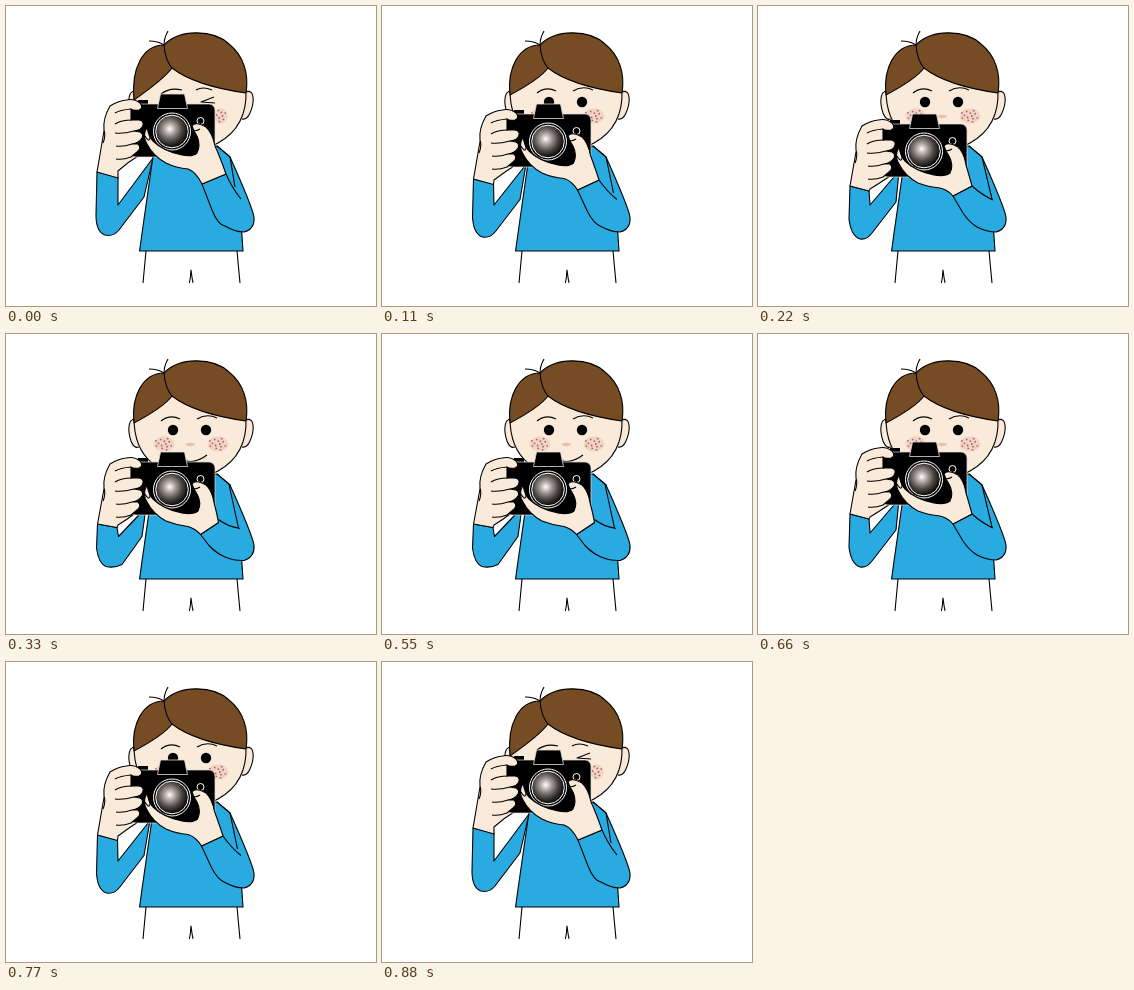
Animation, 370 px wide and 300 px high, one loop 0.99 s. Source, as an HTML page:

```html
<!DOCTYPE html>
<html lang="en">
<head>
<meta charset="utf-8">
<title>Boy with a camera</title>
<style>
  html, body { margin: 0; width: 100%; height: 100%; overflow: hidden; background: #fff; }
  svg { display: block; width: 370px; height: 300px; }
  .skin { fill: #faead9; }
  .shirt { fill: #29abe2; }
  .hair { fill: #754c24; }
  .line { fill: none; }
  .ink { fill: #000; stroke: none; }
</style>
</head>
<body>
<svg viewBox="0 0 370 300" stroke="#000" stroke-width="1.1" stroke-linejoin="round">
  <defs>
    <radialGradient id="glass" cx=".43" cy=".42" r=".57">
      <stop offset="0" stop-color="#fff"/>
      <stop offset=".3" stop-color="#aaa39f"/>
      <stop offset=".65" stop-color="#4e4946"/>
      <stop offset="1" stop-color="#0a0908"/>
    </radialGradient>
  </defs>

  <path class="line" d="M140 245L137 277M231 245L234 277M183.500 277Q184.500 272 185 264Q186 272 187 277"/>

  <g id="head">
    <path class="skin" d="M130 85C121 84 122 98 125 107Q128 115 133 113M239 86C250 82 248 98 244 107Q241 114 236 113"/>
    <path class="skin" d="M128 84C128 104 134 119 146 129C163 147 193 148 212 137C232 126 241 108 240 84L200 50H160Z"/>
    <path class="hair" id="hair"/>
    <path class="line" d="M158 39Q152 35 143 35M158 39Q158 32 162 25"/>
    <g id="openFace">
      <circle class="ink" cx="167" cy="96" r="5.200"/>
      <circle class="ink" cx="200" cy="96" r="5.200"/>
      <path class="line" d="M155 87Q164 80 174 85M191 85Q201 79 211 84M168 121Q184 134 201 121"/>
      <ellipse cx="184.500" cy="110.500" rx="4.500" ry="1.700" fill="#e8bfae" stroke="none"/>
    </g>
    <path id="wink" class="line" d="M155 88Q164 81 176 84M190 84Q197 80 206 84M208 91L195 96L209 97"/>
    <g id="leftCheek" stroke="none"></g>
    <g id="rightCheek" stroke="none"></g>
  </g>

  <path class="shirt" d="M147 150L133.500 245H237L235 215L224 151L211 140Z"/>
  <path class="shirt" id="leftSleeve"/>
  <path class="skin" id="forearm"/>
  <path class="shirt" id="rightSleeve"/>
  <path class="line" id="armFold"/>

  <g id="camera">
    <path class="ink" d="M132 94H142V99H132Z"/>
    <rect x="124" y="98" width="85" height="53" rx="6" stroke="#ddd" stroke-width=".7"/>
    <path d="M154.500 88H178.500L181.500 102.500H151.500Z" stroke="#ddd" stroke-width=".8"/>
    <g stroke="#fff" stroke-width="1">
      <circle cx="166" cy="125.500" r="18.500"/>
      <circle cx="166" cy="125.500" r="16.300" fill="url(#glass)"/>
      <circle cx="194.500" cy="115" r="3.500"/>
    </g>
    <path class="skin" d="M97 137Q100 130 98 124C97 116 100 107 104 100Q112 95 120 94Q128 92 134 97Q138 102 133 104Q127 105 125 103L125 114L133 114Q138 115 137 119Q136 124 128 125L134 126Q138 128 136 132Q133 137 126 138L132 138Q136 142 131 146L125 151Q117 154 110 153"/>
    <path class="line" d="M125 103Q114 104 109 107M126 114Q115 114 109 118M128 125Q117 128 109 127M126 138Q117 141 110 140"/>
  </g>
  <path class="skin" id="rightHand"/>
  <path class="line" id="thumb" d="M186 122Q187 127 194 123M139 130Q143 137 144 132Q144 126 141 122"/>
</svg>

<script>
const el = id => document.getElementById(id);
const STEP = 110, STEPS = 9, LOWEST = 4;

// Each limb is described with the camera raised, halfway and lowered.
const limbs = {
  leftSleeve: [
    "M91 166L90 209Q90 226 99 229Q107 231 113 224L138 191L147 152L112 199L112 171Z",
    "M92 180L91 213Q93 230 102 233Q109 234 114 227L138 196L141 165L112 199L111 185Z",
    "M91 200L90 215Q92 229 98 232Q107 235 118 234L134 209L139 182L113 206L111 202Z"],
  forearm: [
    "M98 125L91 166L112 172L112 165Q122 156 132 150Z",
    "M98 146L92 180L111 185L112 183Q122 177 132 170Z",
    "M98 164L91 200L111 202L112 199Q120 194 127 188Z"],
  rightSleeve: [
    "M220 168L196 178L206 204Q212 219 219 220Q229 226 238 226Q249 223 248 211Q246 200 224 151L211 140",
    "M214 180L195 190L205 207Q211 216 219 221Q229 226 238 226Q249 223 248 211Q246 200 224 151L211 140",
    "M211 197L194 211L201 216Q209 222 219 225Q229 228 238 227Q249 223 248 211Q246 200 224 151L211 140"],
  armFold: [
    "M224 151L229 181M220 168Q226 182 235 193",
    "M224 151L234 193M214 180Q224 189 235 194",
    "M222 150L231 195M211 191Q219 196 233 195"],
  rightHand: [
    "M141 121Q136 130 141 138Q147 150 160 157Q170 162 182 163Q190 166 196 178L220 168Q214 151 209 140Q206 126 200 121Q189 115 186 120Q188 126 191 130Q195 139 191 147Q187 151 176 149Q157 145 147 135Q143 132 141 121Z",
    "M141 141Q136 150 141 158Q147 170 160 177Q170 181 182 182Q190 184 195 190L214 180Q211 169 208 159Q206 146 200 141Q189 135 186 140Q188 146 191 150Q196 159 192 167Q187 171 176 169Q157 165 147 155Q143 152 141 141Z",
    "M141 161Q136 170 141 178Q147 190 160 197Q170 201 182 203Q190 206 194 211L211 197Q210 186 208 178Q206 166 200 161Q189 155 186 160Q188 166 191 170Q196 179 192 187Q187 191 176 189Q157 185 147 175Q143 172 141 161Z"]
};

function morph([high, middle, low], progress) {
  const [from, to] = progress < .5 ? [high, middle] : [middle, low];
  const mix = progress < .5 ? progress * 2 : progress * 2 - 1;
  const ends = to.match(/\d+/g);
  let i = 0;
  return from.replace(/\d+/g, n => +n + (ends[i++] - n) * mix);
}

function cheek(x, rx) {
  const dots = Math.round(rx * 1.2);
  let shapes = `<ellipse cx="${x}" cy="110" rx="${rx}" ry="7.500" fill="#f3d5c6"/>`;
  for (let i = 0; i < dots; i++) {
    const angle = i * 2.4, spread = Math.sqrt((i + .5) / dots);
    shapes += `<circle cx="${x + Math.cos(angle) * spread * (rx - 1)}" cy="${110 + Math.sin(angle) * spread * 6.5}" r=".9" fill="#a5605c"/>`;
  }
  return shapes;
}

function draw(now) {
  const step = Math.floor(now % (STEP * STEPS) / STEP);
  const drop = LOWEST - Math.abs(LOWEST - step);
  const winking = drop === 0;
  const fringe = winking ? 94 : 89;
  for (const id in limbs) el(id).setAttribute("d", morph(limbs[id], drop / LOWEST));
  for (const id of ["camera", "thumb"]) el(id).setAttribute("transform", `translate(0 ${drop * 10})`);
  el("hair").setAttribute("d",
    `M128 ${fringe}C125 62 137 39 158 39C173 23 207 23 223 38C238 50 243 68 240 87C212 83 184 76 166 62Q159 54 158 39Q159 54 166 62Q158 73 128 ${fringe}Z`);
  el("openFace").style.display = winking ? "none" : "";
  el("wink").style.display = winking ? "" : "none";
  el("rightCheek").innerHTML = winking ? cheek(215, 7) : cheek(212, 10.5);
  requestAnimationFrame(() => draw(performance.now() - start));
}

el("leftCheek").innerHTML = cheek(158, 10.5);
const start = performance.now();
draw(0);
</script>
</body>
</html>
```
